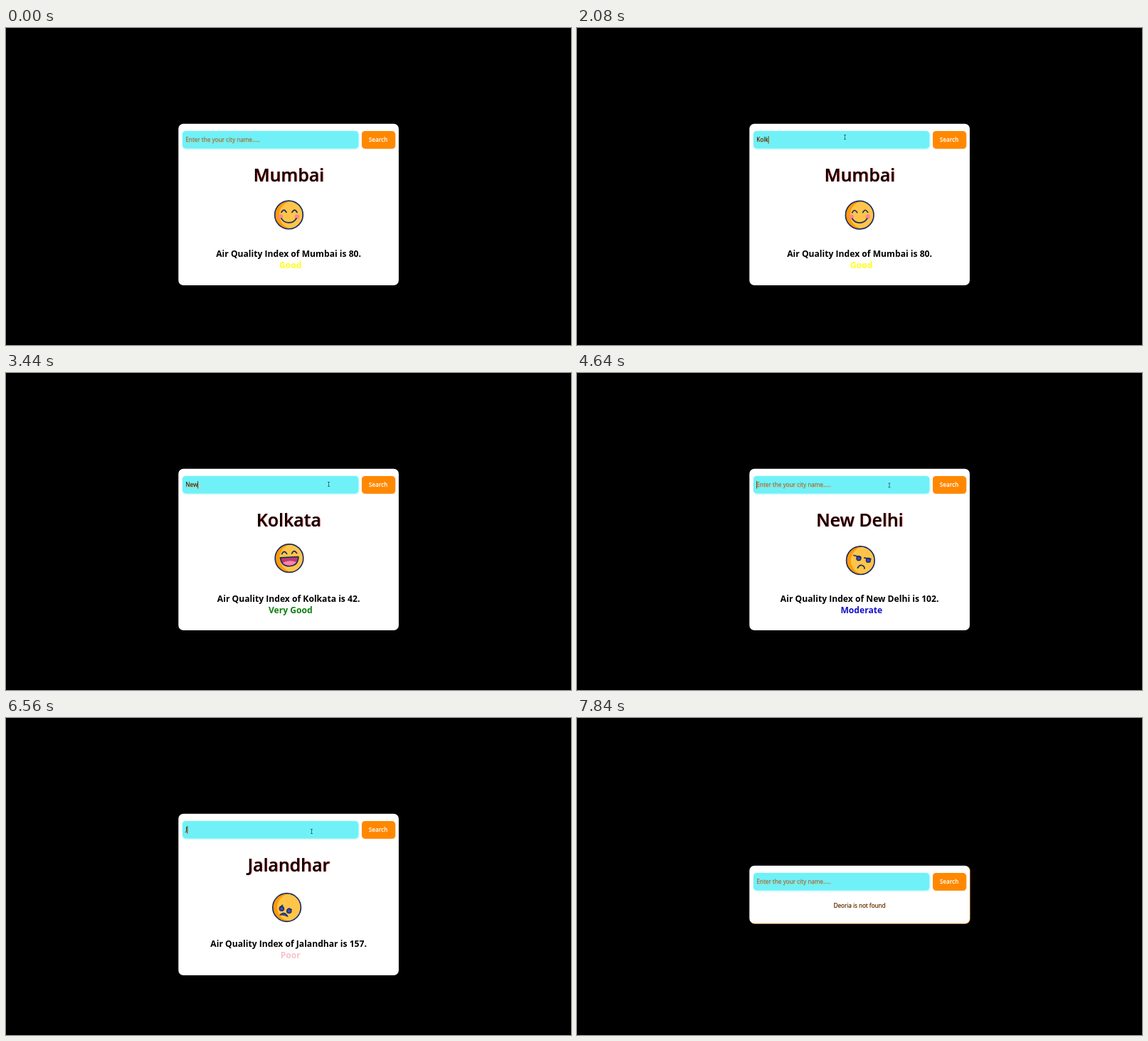
These frames come from a looping animation (794x446 px, 8160 ms). An HTML page with a canvas:

```html
<!DOCTYPE html>
<html lang="en">
<head>
<meta charset="utf-8">
<title>Air quality search</title>
<style>
  html, body { margin: 0; width: 100%; height: 100%; overflow: hidden; background: #000; }
  canvas { display: block; }
</style>
</head>
<body>
<canvas width="794" height="446"></canvas>
<script>
const ctx = document.querySelector('canvas').getContext('2d');
const LOOP = 8160, STEP = 80, NOT_FOUND = 7520;
const NAVY = '#1d2d61', BLUE = '#3f49c8';

// pose: centre, tilt in degrees and the time at which the sway passes through it
const results = [
  { at: 0, city: 'Mumbai', index: 80, status: 'Good', color: '#ffff1e', face: smile, pose: [397.7, 262.8, 1, 1640] },
  { at: 2720, city: 'Kolkata', index: 42, status: 'Very Good', color: '#0f800f', face: laugh, pose: [398, 260.7, -3, 3440] },
  { at: 4320, city: 'New Delhi', index: 102, status: 'Moderate', color: '#1512c8', face: doubt, pose: [398.4, 263.7, 0, 4640] },
  { at: 5840, city: 'Jalandhar', index: 157, status: 'Poor', color: '#f8c2cc', face: sad, pose: [394.6, 266.5, 0, 6560] }
];

// [first key, search done, text]
const entries = [
  [1840, 2720, 'Kolkata'], [3280, 4320, 'New Delhi'], [4720, 5840, 'Jalandhar'],
  [6480, 6640, 'J'], [6720, NOT_FOUND, 'Deoria']
];

// pointer stops: [time, x, y]
const stops = [
  [960, 563, 332], [1200, 561, 320], [1400, 470, 117], [1600, 400, 140], [1800, 376.5, 153.5],
  [2160, 376.5, 153.5], [2400, 564, 157], [2560, 526, 157], [2720, 526, 157], [3120, 453.5, 156.5],
  [3680, 453.5, 156.5], [4000, 522, 157], [4240, 522, 157], [4400, 490, 132], [4560, 439, 158],
  [5280, 439, 158], [5600, 520, 157], [5840, 520, 157], [6240, 429.5, 159.5], [7120, 429.5, 159.5],
  [7360, 520, 157], [7840, 520, 157]
];

function box(x, y, w, h, r, fill) {
  ctx.fillStyle = fill;
  ctx.beginPath();
  ctx.roundRect(x, y, w, h, r);
  ctx.fill();
}

function text(str, x, y, size, weight, color, align = 'center') {
  ctx.font = `${weight} ${size}px "Open Sans", sans-serif`;
  ctx.textAlign = align;
  ctx.fillStyle = color;
  ctx.fillText(str, x, y);
}

function path(d, stroke, fill, width = 1.7) {
  const p = new Path2D(d);
  if (fill) { ctx.fillStyle = fill; ctx.fill(p); }
  if (stroke) { ctx.strokeStyle = stroke; ctx.lineWidth = width; ctx.stroke(p); }
}

function disc(x, y, r, fill, stroke, width = 1.4) {
  ctx.beginPath();
  ctx.arc(x, y, r, 0, Math.PI * 2);
  if (fill) { ctx.fillStyle = fill; ctx.fill(); }
  if (stroke) { ctx.strokeStyle = stroke; ctx.lineWidth = width; ctx.stroke(); }
}

function smile() {
  disc(-11.5, 2.5, 3.2, '#fa8696');
  disc(11.5, 2.5, 3.2, '#fa8696');
  path('M-10.5-3.5Q-7-10-3.5-3.5M4.5-3.5Q8-10 11.5-3.5M-10.5 5Q-7 11 0 11T10.5 5', NAVY);
}

function laugh() {
  path('M-10-6.5Q-6.5-13-3-6.5M4-6.5Q7.5-13 11-6.5', NAVY);
  path('M-12.5-1.5H13Q12 11 .3 11T-12.5-1.5Z', NAVY, '#b83d72');
  path('M-9.5 6Q0 1 9.8 6Q6 10 .3 10T-9.5 6Z', null, '#ff83ac');
}

function doubt() {
  disc(-2.5, -3, 3, BLUE, NAVY);
  disc(11, -.3, 3, BLUE, NAVY);
  path('M-9.5-7.2L.5-4.5M5.5-3.6L14.5-2M-4 10.5Q-1 5.5 2.5 7T5.5 11.5', NAVY);
}

function sad() {
  disc(-7.2, 1.8, 3.1, BLUE, NAVY);
  disc(3.2, 5, 3.1, BLUE, NAVY);
  path('M-9.5-.2L-6-3M3 1.5L6.5 3', NAVY);
  path('M-9.5 10.5Q-3 4.5 1.3 12.8Q-4 9.8-9.5 10.5Z', NAVY, BLUE, 1.3);
}

function drawFace({ face, pose: [x, y, tilt, rest] }, t) {
  const sway = Math.sin((rest - t) / 2960 * Math.PI * 2);
  ctx.save();
  ctx.translate(x + sway * .6, y - sway * .4);
  ctx.rotate((tilt + sway * 2.5) * Math.PI / 180);
  disc(0, 0, 19.8, '#ff9b0a');
  ctx.save();
  ctx.clip();
  disc(6, 0, 19.5, '#ffc54a');
  ctx.restore();
  disc(0, 0, 19.8, null, NAVY, 1.7);
  ctx.lineCap = ctx.lineJoin = 'round';
  face();
  ctx.restore();
}

function drawSearch(t, y) {
  ctx.shadowColor = '#72f3f8';
  ctx.shadowBlur = 2.5;
  box(248, y, 247, 24.3, 4.5, '#70f1f7');
  ctx.shadowColor = '#ff9a2a';
  ctx.shadowBlur = 1;
  box(500, y, 46.7, 24.5, 4.5, '#ff8800');
  ctx.shadowBlur = 0;
  text('Search', 523, y + 14.9, 8.13, 600, '#fff');

  const entry = entries.find(([from, to]) => t >= from && t < to);
  const typed = entry ? entry[2].slice(0, 1 + Math.floor((t - entry[0]) / STEP)) : '';
  const base = y + 14.9;
  if (typed) text(typed, 252.3, base, 8.2, 400, '#111', 'left');
  else text('Enter the your city name.....', 252.3, base, 8.2, 400, '#5d7778', 'left');
  if (t >= 1680 && t < NOT_FOUND) {
    const caret = 252.3 + (typed ? ctx.measureText(typed).width : 0);
    ctx.fillStyle = '#222';
    ctx.fillRect(caret, y + 7, .7, 10.5);
  }
}

function drawPointer(t) {
  const i = stops.findIndex(s => s[0] > t);
  if (i < 1) return;
  const [t0, x0, y0] = stops[i - 1], [t1, x1, y1] = stops[i];
  const u = (t - t0) / (t1 - t0), k = u * u * (3 - 2 * u);
  const x = x0 + (x1 - x0) * k, y = y0 + (y1 - y0) * k;
  const inField = t < NOT_FOUND && x > 248 && x < 495 && y > 145 && y < 169;
  ctx.save();
  ctx.translate(x, y);
  if (inField) path('M-1.5-3H1.5M0-3V3M-1.5 3H1.5', '#245a5d', null, .8);
  else path('M0 0V6.8L1.6 5.4 2.7 7.8 3.8 7.3 2.8 5H4.7Z', '#222', '#fff', .5);
  ctx.restore();
}

function draw(t) {
  ctx.fillStyle = '#000';
  ctx.fillRect(0, 0, 794, 446);
  if (t >= NOT_FOUND) {
    box(242.3, 207.7, 309.6, 81.4, 7, '#fff');
    drawSearch(t, 218);
    text('Deoria is not found', 397, 266.6, 8.13, 400, '#2b1414');
  } else {
    const result = results.findLast(r => t >= r.at);
    box(242.3, 134.7, 309.6, 227.3, 7, '#fff');
    drawSearch(t, 145);
    ctx.shadowColor = '#e02020';
    ctx.shadowOffsetX = ctx.shadowOffsetY = .6;
    ctx.shadowBlur = 1;
    text(result.city, 397.3, 215.8, 24.9, 600, '#0c0000');
    ctx.shadowColor = 'transparent';
    drawFace(result, t);
    text(`Air Quality Index of ${result.city} is ${result.index}.`, 397.1, 321.6, 12.13, 700, '#000');
    text(result.status, 399.8, 338.3, 12.13, 700, result.color);
  }
  drawPointer(t);
}

function tick() {
  draw(Math.floor(performance.now() % LOOP / STEP) * STEP);
  requestAnimationFrame(tick);
}
tick();
</script>
</body>
</html>
```
